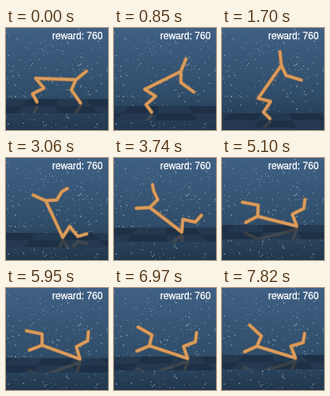
Recreate the animation shown at these times as an HTML page. Size 128 by 128 pixels, loop 7.99 s.

```html
<!DOCTYPE html>
<html lang="en">
<head>
<meta charset="utf-8">
<title>Cheetah run</title>
<style>
  html, body { margin: 0; width: 100%; height: 100%; overflow: hidden; background: #263f5a; }
  svg { display: block; width: 100vw; height: 100vh; }
  text { font: 12px "Liberation Sans", Arial, sans-serif; fill: #fff; stroke: #fff; stroke-width: .3; }
  .body { fill: none; stroke-linecap: round; stroke-linejoin: round; }
</style>
</head>
<body>
<svg viewBox="0 0 128 128">
  <defs>
    <linearGradient id="sky" x1="0" y1="0" x2="0" y2="1">
      <stop offset="0" stop-color="#3f6084"/>
      <stop offset=".6" stop-color="#314f6c"/>
      <stop offset="1" stop-color="#21374d"/>
    </linearGradient>
    <clipPath id="strip"><rect width="128" height="18"/></clipPath>
  </defs>
  <rect width="128" height="128" fill="url(#sky)"/>
  <g id="stars" fill="#e2ebf4"></g>
  <g id="floor" clip-path="url(#strip)">
    <rect width="128" height="18" fill="#1d3045"/>
    <path id="tiles" fill="#24394f"/>
    <path id="mirror" class="body" stroke="#c08a50" stroke-width="4" opacity=".18"/>
  </g>
  <path id="edge" class="body" stroke="#b07a44" stroke-width="4.6"/>
  <path id="limbs" class="body" stroke="#d99c5e" stroke-width="3.2"/>
  <text x="58" y="14">reward: 760</text>
</svg>
<script>
const LOOP = 7990, STEP = 170, LAST = LOOP - STEP;
const TORSO = 50.5, HEAD = 17, HEAD_TILT = -41;
const REAR = [16, 16, 11.5], FRONT = [14, 12, 8];
const $ = id => document.getElementById(id);

// Torso centre and angle, horizon height, and each leg's joint bends in degrees
const poses = [
  { t: 0,    x: 62.5, y: 64,   turn: 2,    floor: 89,  rear: [48, 103, -92], front: [112, -59, 0] },
  { t: 1700, x: 60,   y: 67.5, turn: -55,  floor: 107, rear: [70, 109, -79], front: [120, -48, 0] },
  { t: 3060, x: 60.5, y: 76.5, turn: -115, floor: 94,  rear: [58, 107, -65], front: [111, -55, 29] },
  { t: 4420, x: 69.5, y: 78.5, turn: -170, floor: 81,  rear: [57, 88, -56],  front: [84, -85, 0] },
  { t: 5950, x: 69,   y: 80.5, turn: -160, floor: 88,  rear: [54, 78, -57],  front: [70, -78, 0] },
  { t: LAST, x: 68,   y: 80.5, turn: -163, floor: 84,  rear: [52, 95, -65],  front: [96, -70, 0] }
];

const mix = (a, b, k) => Array.isArray(a) ? a.map((v, i) => mix(v, b[i], k)) : a + (b - a) * k;
const ease = f => f * f * (3 - 2 * f);

function step([x, y], len, deg) {
  const a = deg * Math.PI / 180;
  return [x + len * Math.cos(a), y + len * Math.sin(a)];
}

function chain(from, deg, lengths, bends) {
  return lengths.reduce((pts, len, i) => {
    deg += bends[i];
    return [...pts, step(pts[pts.length - 1], len, deg)];
  }, [from]);
}

function poseAt(t) {
  const i = Math.max(1, poses.findIndex(p => p.t >= t));
  const a = poses[i - 1], b = poses[i], k = ease((t - a.t) / (b.t - a.t)), out = {};
  for (const key in a) out[key] = mix(a[key], b[key], k);
  return out;
}

function skeleton({ x, y, turn, rear, front }) {
  const hip = step([x, y], -TORSO / 2, turn), shoulder = step([x, y], TORSO / 2, turn);
  return [
    [hip, shoulder, step(shoulder, HEAD, turn + HEAD_TILT)],
    chain(hip, turn, REAR, rear),
    chain(shoulder, turn, FRONT, front)
  ];
}

const trace = lines => lines.map(pts =>
  "M" + pts.map(p => p.map(v => v.toFixed(2)).join(" ")).join("L")).join("");

// Two rows of checks, widening toward the viewer
function checks(shift) {
  const at = (n, r) => `${(64 + (n - shift) * (36 + 8 * r)).toFixed(2)} ${9 * r}`;
  let d = "";
  for (let r = 0; r < 2; r++)
    for (let n = -4 + r; n < 8; n += 2)
      d += `M${at(n, r)}L${at(n + 1, r)}L${at(n + 1, r + 1)}L${at(n, r + 1)}Z`;
  return d;
}

function addStars() {
  let seed = 71, dots = "";
  const rnd = (lo, hi) => {
    seed = seed * 16807 % 2147483647;
    return (lo + (hi - lo) * seed / 2147483647).toFixed(2);
  };
  for (let i = 0; i < 240; i++) {
    const size = rnd(0.6, 1.2);
    dots += `<rect x="${rnd(0, 128)}" y="${rnd(0, 128)}" width="${size}" height="${size}" opacity="${rnd(0.25, 0.95)}"/>`;
  }
  $("stars").innerHTML = dots;
}

function draw(ms) {
  const t = Math.floor(ms % LOOP / STEP) * STEP;
  const pose = poseAt(t), lines = skeleton(pose), d = trace(lines);
  const ground = Math.max(...lines.flat().map(p => p[1])) + 2;
  const mirrored = lines.map(pts => pts.map(([x, y]) => [x, 2 * ground - y - pose.floor]));
  $("limbs").setAttribute("d", d);
  $("edge").setAttribute("d", d);
  $("mirror").setAttribute("d", trace(mirrored));
  $("floor").setAttribute("transform", `translate(0 ${pose.floor.toFixed(2)})`);
  $("tiles").setAttribute("d", checks(2 * t / LAST));
}

addStars();
const start = performance.now();
function tick() {
  draw(performance.now() - start);
  requestAnimationFrame(tick);
}
tick();
</script>
</body>
</html>
```
